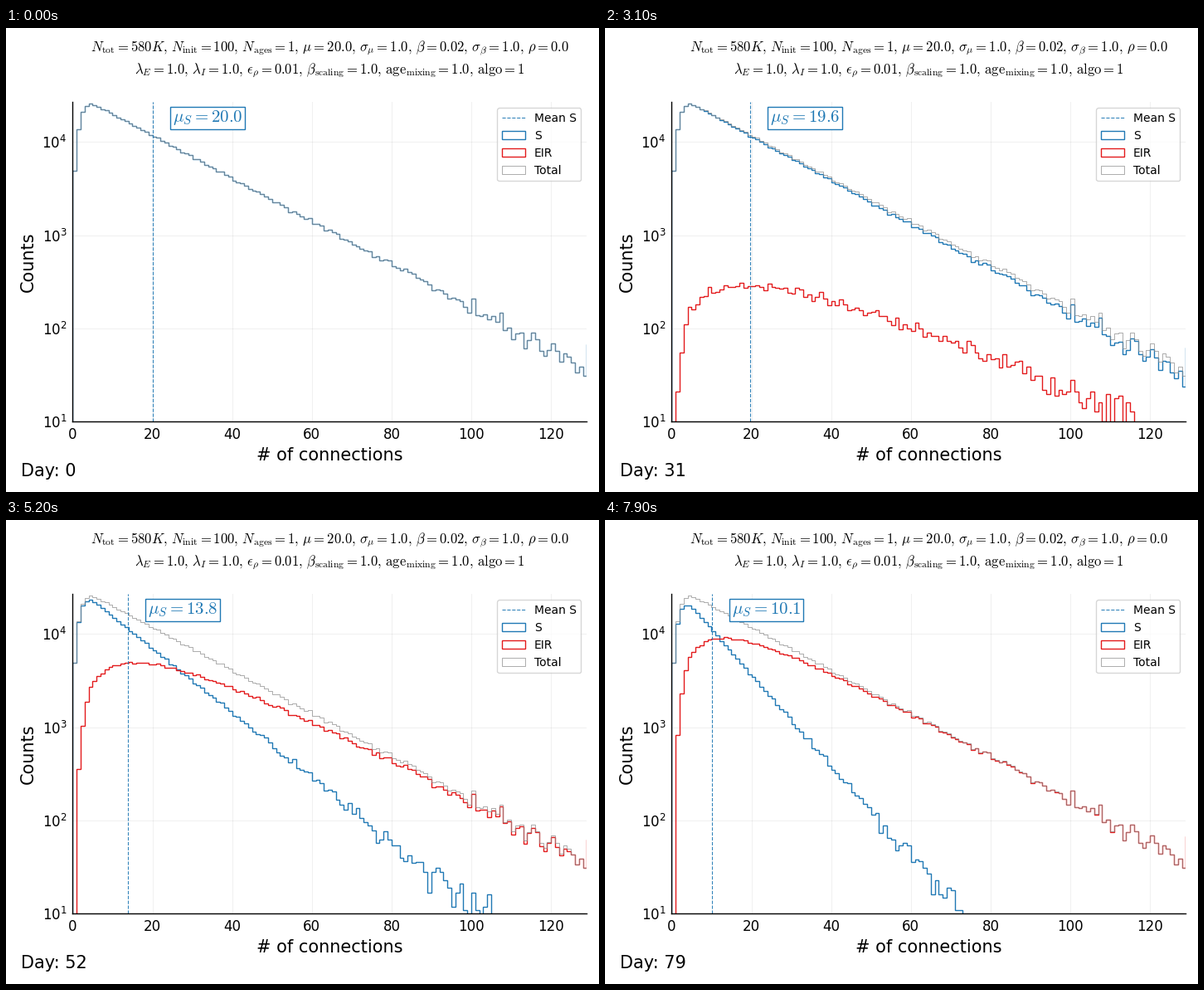
These frames come from a looping animation (715 px wide and 559 px high, 8000 ms). A matplotlib script:

```python
import matplotlib.pyplot as plt
import numpy as np
from matplotlib.animation import FuncAnimation
from matplotlib.patches import Patch

W, H, DPI = 715, 559, 100
DAYS, INTERVAL = 80, 100
BLUE, RED, GRAY = "#1f78b4", "#e31a1c", "#8c8c8c"

plt.rcParams.update({"font.family": "DejaVu Sans", "mathtext.fontset": "cm"})

k = np.arange(130)
rng = np.random.default_rng(11)


def degree_counts():
    """Short rise, then exponential decay with counting noise."""
    rise = 1 - 0.848 * np.exp(-0.41 * k ** 1.4)
    counts = rng.poisson(33170 * np.exp(-0.053 * k) * rise)
    counts[-1] *= 2  # the last bin is closed on both sides
    return counts


def exposure(day):
    """Cumulative infection pressure per connection."""
    return 0.061 / (1 + np.exp(-0.17 * (day - 53.5)))


def simulate(left):
    level, rows = 0.0, []
    for day in range(DAYS):
        left = rng.binomial(left, np.exp(-k * (exposure(day) - level)))
        level = exposure(day)
        rows.append(left)
    return np.array(rows)


total = degree_counts()
S = simulate(total)
mean_s = S @ k / S.sum(axis=1)
mean_s *= 20.02 / mean_s[0]

fig = plt.figure(figsize=(W / DPI, H / DPI), dpi=DPI)
ax = fig.add_axes([80.4 / W, (H - 474.4) / H, 620 / W, 385 / H])
ax.set(xlim=(0, 129), yscale="log", ylim=(10, 10 ** 4.4275))
ax.spines[["top", "right"]].set_visible(False)
ax.spines[["left", "bottom"]].set_linewidth(1)
ax.tick_params(which="both", length=0, pad=5, labelsize=12)
ax.minorticks_off()
ax.grid(color=GRAY, alpha=0.12, lw=0.8)
ax.set_axisbelow(True)
ax.set_xlabel("# of connections", fontsize=15)
ax.set_ylabel("Counts", fontsize=15, labelpad=5)


def steps(color, lw):
    return ax.stairs(np.maximum(total, 1), np.arange(131), baseline=1,
                     color=color, lw=lw)


def key(color, lw, label):
    return Patch(fill=False, edgecolor=color, lw=lw, label=label)


mean_line = ax.axvline(20, color=BLUE, lw=0.8, ls="--", alpha=0.9,
                       label="Mean S")
s_steps = steps(BLUE, 1)
e_steps = steps(RED, 1)
steps(GRAY, 0.5)
ax.legend(handles=[mean_line, key(BLUE, 1, "S"), key(RED, 1, "EIR"),
                   key(GRAY, 0.5, "Total")],
          loc="upper right", fontsize=10)

TITLE = [
    [r"N_\mathrm{tot} = 580K", r"N_\mathrm{init} = 100",
     r"N_\mathrm{ages} = 1", r"\mu = 20.0", r"\sigma_\mu = 1.0",
     r"\beta = 0.02", r"\sigma_\beta = 1.0", r"\rho = 0.0"],
    [r"\lambda_E = 1.0", r"\lambda_I = 1.0", r"\epsilon_\rho = 0.01",
     r"\beta_\mathrm{scaling} = 1.0", r"\mathrm{age}_\mathrm{mixing} = 1.0",
     r"\mathrm{algo} = 1"],
]
for parts, y in zip(TITLE, (29, 55)):
    fig.text(390.4 / W, 1 - y / H, "$" + r",\,".join(parts) + "$",
             fontsize=12, ha="center", va="baseline")

mean_text = ax.text(25, 0.951, "", transform=ax.get_xaxis_transform(),
                    fontsize=15, color=BLUE, va="center",
                    bbox=dict(facecolor="white", edgecolor=BLUE, lw=1, pad=2))
day_text = fig.text(18 / W, 1 - 540 / H, "", fontsize=15, va="baseline")


def update(day):
    s_steps.set_data(np.maximum(S[day], 1))
    e_steps.set_data(np.maximum(total - S[day], 1))
    mu = mean_s[day]
    mean_line.set_xdata([mu, mu])
    mean_text.set_x(mu + 5)
    mean_text.set_text(rf"$\mu_S = {mu:.1f}$")
    day_text.set_text(f"Day: {day}")
    return s_steps, e_steps, mean_line, mean_text, day_text


anim = FuncAnimation(fig, update, frames=DAYS, interval=INTERVAL,
                     repeat=True, repeat_delay=0, blit=False)
plt.show()
```
